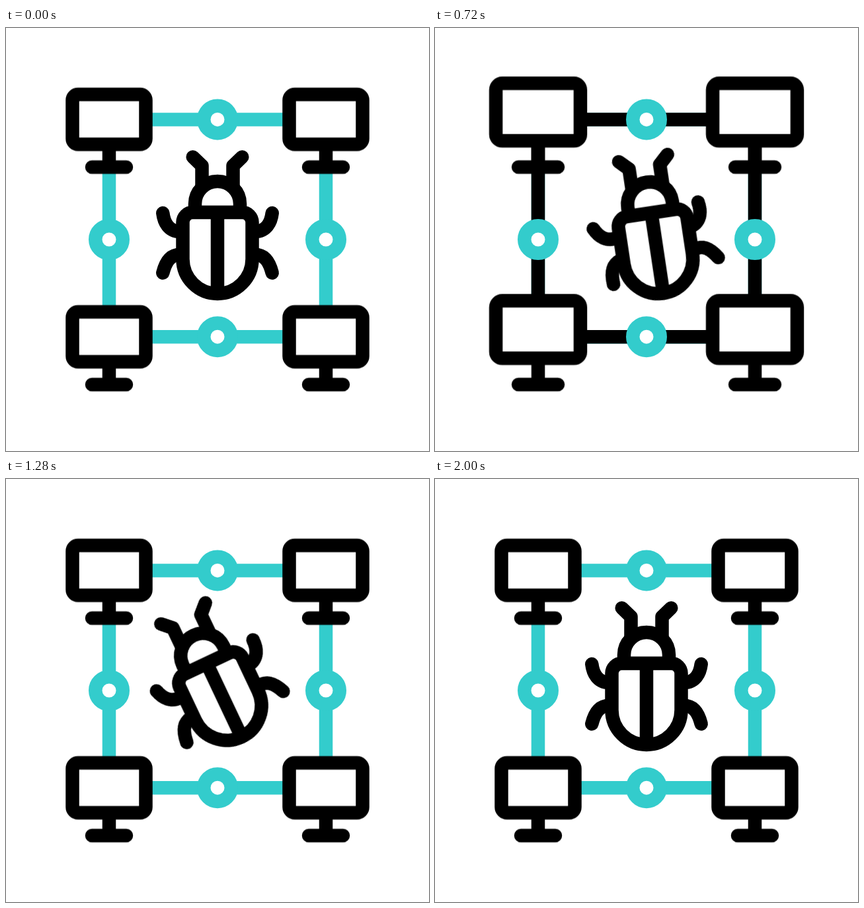
An HTML page without scripts for the animation above (2.4 s loop, 640x640 px).

```html
<!DOCTYPE html>
<html lang="en">
<head>
<meta charset="utf-8">
<title>Infected network</title>
<style>
  html, body { margin: 0; width: 100%; height: 100%; overflow: hidden; background: #fff; }
  svg { display: block; width: 100vw; height: 100vh; }
  svg * {
    --sine: cubic-bezier(.37, 0, .63, 1);
    --in: cubic-bezier(.42, 0, .8, .7);
    --out: cubic-bezier(.2, .4, .5, 1);
  }
  .art { fill: #fff; stroke: #000; stroke-width: 20.5; stroke-linecap: round; stroke-linejoin: round; }
  .wire { fill: none; stroke-linecap: butt; }
  .teal { stroke: #33cccc; }

  .spread { stroke-dasharray: 164 400; animation: spread 2.4s linear infinite; }
  .ring { r: 20.75px; animation: ring 2.4s linear infinite; }
  .pc { transform-origin: 0 0; animation: pc 2.4s linear infinite; }
  .pc * { vector-effect: non-scaling-stroke; }
  .bug { transform-origin: 320px 317px; animation: bug 2.4s linear infinite; }
  .leg { fill: none; animation: leg 2.4s linear infinite; }

  @keyframes spread {
    0%, 17.5% { stroke-dashoffset: 164; animation-timing-function: var(--sine); }
    28.75%, 39.5% { stroke-dashoffset: 0; animation-timing-function: var(--sine); }
    51.5%, 100% { stroke-dashoffset: 164; }
  }
  @keyframes ring {
    0%, 30.4% { r: 20.75px; animation-timing-function: var(--sine); }
    38.6% { r: 24.9px; animation-timing-function: var(--sine); }
    47%, 100% { r: 20.75px; }
  }
  @keyframes pc {
    0%, 9.17% { transform: scale(1); animation-timing-function: var(--sine); }
    16.67% { transform: scale(.854); animation-timing-function: var(--sine); }
    30.42% { transform: scale(1.152); animation-timing-function: var(--sine); }
    43.75% { transform: scale(.85); animation-timing-function: var(--sine); }
    53.33%, 100% { transform: scale(1); }
  }
  @keyframes bug {
    0%, 9.17% { transform: none; }
    15.83% { transform: translate(-3.9px, 10.5px) rotate(-18px); transform: translate(-3.9px, 10.5px) rotate(-18deg); animation-timing-function: var(--out); }
    20.42% { transform: translate(-1px, 9px) rotate(-25deg); animation-timing-function: var(--in); }
    30% { transform: translate(12.9px, .4px) rotate(-8.6deg); animation-timing-function: var(--out); }
    38.33% { transform: translate(14.5px, -9.8px) rotate(29.8deg); animation-timing-function: var(--sine); }
    53.33% { transform: translate(.1px, -3.5px) rotate(-25.4deg); animation-timing-function: var(--sine); }
    62.5% { transform: translate(3px, 1px) rotate(22deg); animation-timing-function: var(--in); }
    69.17% { transform: translate(3.1px, 1.4px) rotate(7.1deg); animation-timing-function: var(--out); }
    75.83% { transform: translate(-1px, -5px) rotate(-24deg); animation-timing-function: var(--sine); }
    83.33%, 100% { transform: none; }
  }
  @keyframes leg {
    0%, 9.17% { transform: rotate(0deg); animation-timing-function: var(--sine); }
    16.58% { transform: rotate(-20deg); animation-timing-function: var(--sine); }
    24% { transform: rotate(0deg); animation-timing-function: var(--sine); }
    32.7% { transform: rotate(-20deg); animation-timing-function: var(--sine); }
    38.5% { transform: rotate(0deg); animation-timing-function: var(--sine); }
    50% { transform: rotate(-20deg); animation-timing-function: var(--sine); }
    60% { transform: rotate(0deg); animation-timing-function: var(--sine); }
    70% { transform: rotate(-20deg); animation-timing-function: var(--sine); }
    83.33%, 100% { transform: rotate(0deg); }
  }
</style>
</head>
<body>
<svg viewBox="0 0 640 640">
  <g class="art">
    <path class="wire teal" d="M156 138.4H484M156 467.2H484M156 210V460M484 210V460"/>

    <!-- each dark wire runs from a computer to the middle of its side -->
    <g class="wire">
      <path class="spread" d="M156 138.4H320"/>
      <path class="spread" d="M484 138.4H320"/>
      <path class="spread" d="M156 467.2H320"/>
      <path class="spread" d="M484 467.2H320"/>
      <path class="spread" d="M156 156V320"/>
      <path class="spread" d="M156 484V320"/>
      <path class="spread" d="M484 156V320"/>
      <path class="spread" d="M484 484V320"/>
    </g>

    <g class="teal">
      <circle class="ring" cx="320" cy="138.4" r="20.75"/>
      <circle class="ring" cx="320" cy="467.2" r="20.75"/>
      <circle class="ring" cx="156" cy="320" r="20.75"/>
      <circle class="ring" cx="484" cy="320" r="20.75"/>
    </g>

    <!-- computers grow from the middle of their foot -->
    <g transform="translate(156 210.5)"><g class="pc"><path d="M0-34V0M-26 0H26"/><rect x="-55.5" y="-110" width="111" height="75.5" rx="8.5"/></g></g>
    <g transform="translate(484 210.5)"><g class="pc"><path d="M0-34V0M-26 0H26"/><rect x="-55.5" y="-110" width="111" height="75.5" rx="8.5"/></g></g>
    <g transform="translate(156 539.5)"><g class="pc"><path d="M0-34V0M-26 0H26"/><rect x="-55.5" y="-110" width="111" height="75.5" rx="8.5"/></g></g>
    <g transform="translate(484 539.5)"><g class="pc"><path d="M0-34V0M-26 0H26"/><rect x="-55.5" y="-110" width="111" height="75.5" rx="8.5"/></g></g>

    <g class="bug">
      <path class="leg" style="transform-origin:263px 308px" d="M237.3 280C239 294 246 308 263 308"/>
      <path class="leg" style="transform-origin:377px 308px" d="M402.7 280C401 294 394 308 377 308"/>
      <path class="leg" style="transform-origin:263px 343px" d="M237.3 370.5C241 356 247 343 263 343"/>
      <path class="leg" style="transform-origin:377px 343px" d="M402.7 370.5C399 356 393 343 377 343"/>
      <path fill="none" d="M282.7 195.2L296.5 208.5V240M357.3 195.2L343.5 208.5V240"/>
      <path d="M286 279V266a34 34 0 0 1 68 0V279z"/>
      <path d="M282.5 279H357.5a15 15 0 0 1 15 15V349.5a52.5 52.5 0 0 1-105 0V294a15 15 0 0 1 15-15zM320 279V402"/>
    </g>
  </g>
</svg>
</body>
</html>
```
